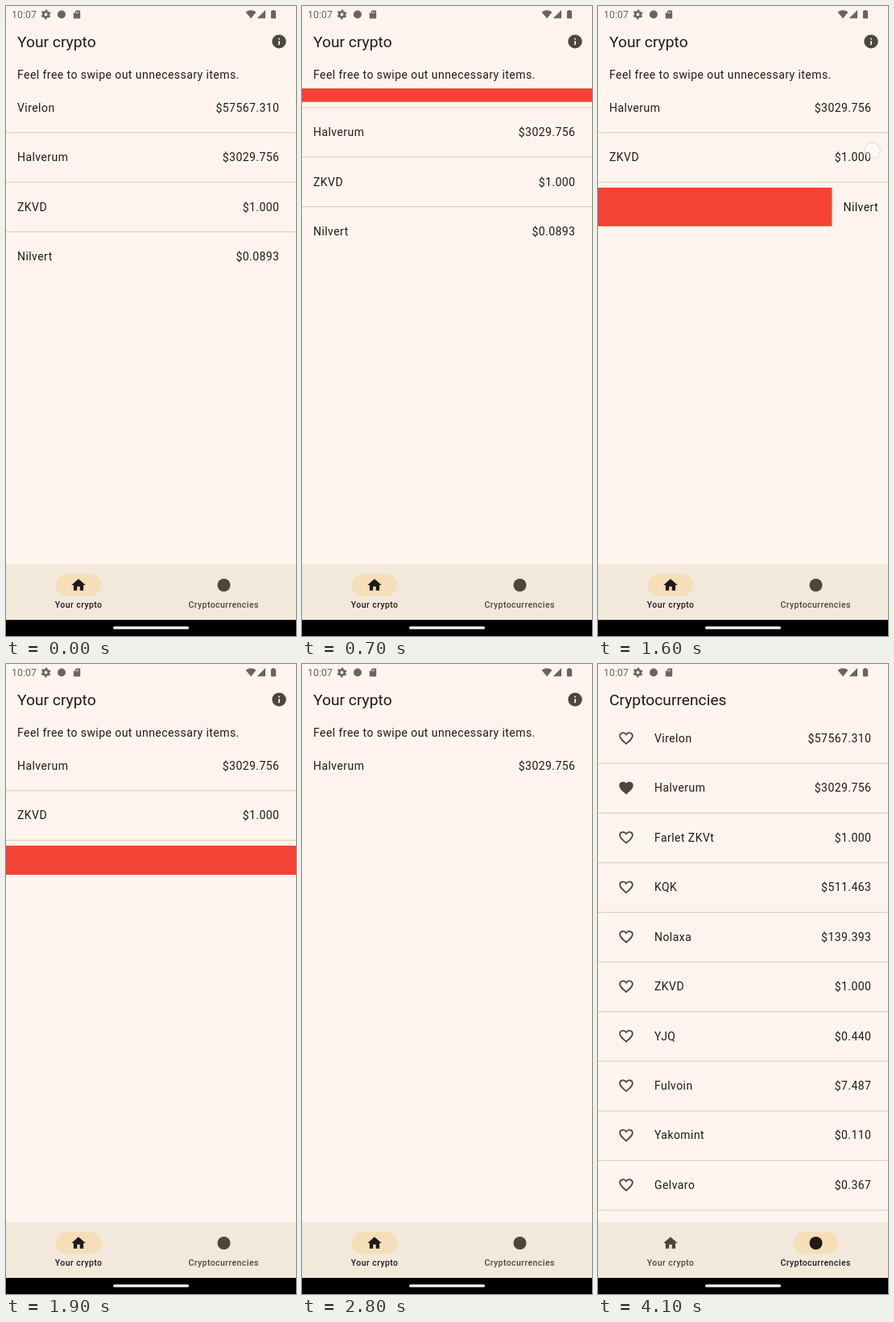
An HTML page for the animation above (4.5 s loop, 360 by 780 pixels).

```html
<!DOCTYPE html>
<html lang="en">
<head>
<meta charset="utf-8">
<title>Your crypto</title>
<style>
  html, body { margin: 0; width: 100%; height: 100%; overflow: hidden; background: #fff5ee; }
  svg { display: block; width: 360px; height: 780px; }
  text { font: 14px Roboto, sans-serif; letter-spacing: .44px; fill: #1f1b16; }
  .title { font-size: 19.25px; letter-spacing: 0; }
  .clock { font-size: 12.3px; letter-spacing: .1px; fill: #6b645f; }
  .label { font-size: 10.5px; font-weight: 500; text-anchor: middle; }
  .price { text-anchor: end; }
</style>
</head>
<body>
<svg id="stage" viewBox="0 0 360 780"></svg>
<script>
const LOOP = 4500, STEP = 100;
const WIDTH = 360, ROW = 47.8, GAP = 13.65, TOP = 102;
const SLIDE = 270, COLLAPSE = 180, TAP = 3600, SWITCH = 3650;
const PAPER = '#fff5ee', INK = '#1f1b16', SOFT = '#4f4539', GREY = '#6b645f';

const HOME = 'M10 20v-6h4v6h5v-8h3L12 3 2 12h3v8z';
const INFO = 'M12 2a10 10 0 0 0 0 20 10 10 0 0 0 0-20zm1 15h-2v-6h2zm0-8h-2V7h2z';
const HEART = 'M12 20C6.4 15 3 12 3 8.5C3 3.6 9.5 2.3 12 6.6C14.5 2.3 21 3.6 21 8.5C21 12 17.6 15 12 20z';

const market = `Virelon $57567.310, Halverum $3029.756, Farlet ZKVt $1.000, KQK $511.463, Nolaxa $139.393,
  ZKVD $1.000, YJQ $0.440, Fulvoin $7.487, Yakomint $0.110, Gelvaro $0.367`.split(/,\s+/);

// begin: the row starts to slide; shrink: it starts to collapse; grip: where the finger lands
const owned = [
  { coin: market[0], begin: 170, shrink: 632, grip: [60, 150] },
  { coin: market[1] },
  { coin: market[5], begin: 2347, shrink: 2617, grip: [182, 201] },
  { coin: 'Nilvert $0.0893', begin: 1406, shrink: 1868, grip: [50, 237] }
];

const clamp = v => Math.max(0, Math.min(1, v));
const smooth = p => p * p * (3 - 2 * p);

function bezier(x1, y1, x2, y2) {
  const at = (a, b, u) => 3 * a * u * (1 - u) ** 2 + 3 * b * u * u * (1 - u) + u ** 3;
  return x => {
    let lo = 0, hi = 1;
    for (let i = 0; i < 24; i++) {
      const mid = (lo + hi) / 2;
      if (at(x1, x2, mid) < x) lo = mid; else hi = mid;
    }
    return at(y1, y2, lo);
  };
}
const ease = bezier(.25, .1, .25, 1);
const emphasized = bezier(.2, 0, 0, 1);

const slide = (o, t) => o.begin ? WIDTH * smooth(clamp((t - o.begin) / SLIDE)) : 0;
const height = (o, t) => o.begin ? ROW * (1 - ease(clamp((t - o.shrink) / COLLAPSE))) : ROW;
const present = (o, t) => !o.begin || t < o.shrink + COLLAPSE;

const text = (x, y, s, cls = '', fill = '') =>
  `<text x="${x}" y="${y}" class="${cls}"${fill && ` style="fill:${fill}"`}>${s}</text>`;
const rect = (x, y, w, h, fill, r = 0, more = '') =>
  `<rect x="${x}" y="${y}" width="${w}" height="${h}" rx="${r}" fill="${fill}" ${more}/>`;
const circle = (x, y, r, fill, more = '') => `<circle cx="${x}" cy="${y}" r="${r}" fill="${fill}" ${more}/>`;
const icon = (x, y, d, fill, more = '') =>
  `<path transform="translate(${x} ${y}) scale(.875 .853) translate(-12 -12)" d="${d}" fill="${fill}" fill-rule="evenodd" ${more}/>`;
const line = y => rect(0, y - .4, WIDTH, 1, '#d6cac0');

function entry(x, y, coin, dx = 0) {
  const [name, price] = coin.split(' $');
  return text(x + dx, y, name) + text(339.4 + dx, y, '$' + price, 'price');
}

function statusBar() {
  const ring = (r, w, dash) =>
    circle(49.5, 10.5, r, 'none', `stroke="${GREY}" stroke-width="${w}" stroke-dasharray="${dash}"`);
  return text(7, 15, '10:07', 'clock') +
    ring(3.2, 2.6, 'none') + ring(5, 1.9, '0 1.318 2.6 1.318') +
    circle(69, 10.5, 5, GREY) +
    `<g fill="${GREY}">
      <path d="M87 5.5h4.2q1 0 1 1v8q0 1-1 1h-6.4q-1 0-1-1v-5.8z"/>
      <path d="M297.5 7.6q6.5-4.6 13 0l-6.5 7.9z"/>
      <path d="M322 5v10.3h-10.3z"/>
    </g>` +
    [85.2, 87.2, 89.2].map(x => rect(x, 7, .8, 2.2, PAPER)).join('') +
    rect(328.9, 6.1, 6.2, 9.4, GREY, .8) + rect(330.7, 5, 2.6, 1.5, GREY);
}

function ownedPage(t) {
  let out = text(14, 51, 'Your crypto', 'title') + icon(339, 44, INFO, SOFT) +
    text(14, 90, 'Feel free to swipe out unnecessary items.');
  let y = TOP;
  owned.filter(o => present(o, Math.max(0, t - STEP + 1)) && present(o, t) || lingers(o, t)).forEach((o, i) => {
    if (i) {
      out += line(y + GAP / 2);
      y += GAP;
    }
    const dx = slide(o, t), h = height(o, t);
    if (dx > 0) out += rect(0, y, dx, h, '#f44336');
    if (dx < WIDTH) out += entry(14, y + 29, o.coin, dx);
    y += h;
  });
  return out;
}

// A collapsed row keeps its divider until the next step
function lingers(o, t) {
  return o.begin && t < Math.ceil((o.shrink + COLLAPSE) / STEP) * STEP;
}

function marketPage() {
  return text(14, 51, 'Cryptocurrencies', 'title') + market.map((coin, i) => {
    const y = 92 + i * (ROW + GAP);
    return icon(35, y, HEART, i === 1 ? SOFT : 'none', `stroke="${SOFT}" stroke-width="2"`) +
      entry(70, y + 4.8, coin) + line(y + 31);
  }).join('');
}

function navBar(t) {
  const open = t >= SWITCH, age = t - SWITCH;
  const grow = .4 + .6 * emphasized(clamp(age / 450));
  const fade = clamp(age / 100);
  const pill = (x, scale, alpha) =>
    rect(x - 28 * scale, 703.3, 56 * scale, 27.3, '#f5deb8', 13.65, `opacity="${alpha}"`);
  const ink = on => on ? INK : SOFT;
  return rect(0, 691, WIDTH, 69, '#f2e8dc') +
    pill(90, 1, 1 - fade) + pill(270, grow, fade) +
    icon(90, 717, HOME, ink(!open)) + circle(270.5, 717, 8, ink(open)) +
    text(90.2, 744.5, 'Your crypto', 'label', ink(!open)) +
    text(270.2, 744.5, 'Cryptocurrencies', 'label', ink(open)) +
    rect(0, 760, WIDTH, 20, '#000') + rect(133, 768.3, 94, 3.2, '#fff', 1.6);
}

function touch(x, y, alpha) {
  return alpha <= 0 ? '' :
    circle(x, y, 9.8, '#fff', `fill-opacity=".75" stroke="#c2bcb8" opacity="${Math.min(1, alpha)}"`);
}

// The finger travels with the row, drifts upwards and fades near the edge
function pointer(t) {
  if (t >= TAP) return touch(269, 719, .85 - (t - TAP) / 200);
  const o = owned.find(o => t > o.begin - 100 && t < o.begin + SLIDE);
  if (!o) return '';
  const dx = slide(o, t), x = o.grip[0] + dx;
  return touch(x, o.grip[1] - .2 * dx, (WIDTH - x) / 40);
}

const stage = document.getElementById('stage');
const start = performance.now();
let shown = -1;

function draw(now) {
  const t = Math.floor((Math.max(0, now - start) % LOOP) / STEP) * STEP;
  if (t !== shown) {
    shown = t;
    stage.innerHTML = rect(0, 0, WIDTH, 780, PAPER) + statusBar() +
      (t < SWITCH ? ownedPage(t) : marketPage()) + navBar(t) + pointer(t);
  }
  requestAnimationFrame(draw);
}
draw(start);
</script>
</body>
</html>
```
